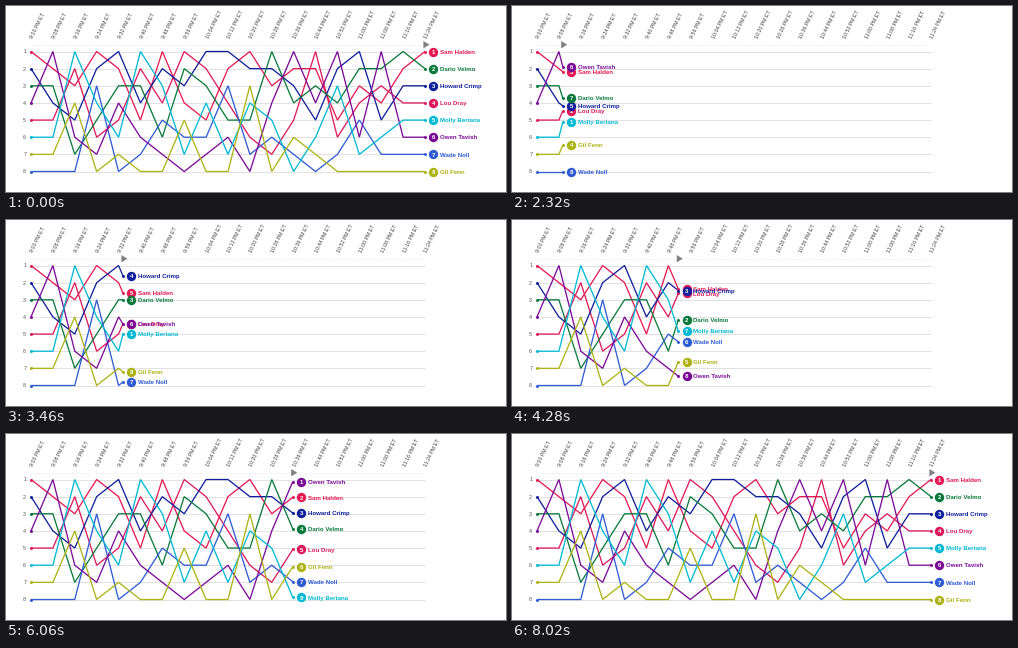
These frames come from a looping animation (500x186 px, 8340 ms). A matplotlib script:

```python
import math

import numpy as np
import matplotlib.pyplot as plt
from matplotlib.animation import FuncAnimation

W, H, DPI = 500, 186, 100
STEP_MS, LOOP_MS = 20, 8340
LEFT, RIGHT, TOP, BOTTOM = 25, 419, 45.5, 165.5
COLS = 19
GAP = (RIGHT - LEFT) / (COLS - 1)

# name, colour, rank at each time column; listed from back to front
RUNNERS = [
    ("Lou Dray", "#dc1a5b", "5526524124675164344"),
    ("Sam Halden", "#e51a53", "1231251452132253421"),
    ("Howard Crimp", "#10209a", "2452142311223521533"),
    ("Dario Velmo", "#0a7a3c", "3375336235514342212"),
    ("Wade Noll", "#2f5bd3", "8883875663767875777"),
    ("Owen Tavish", "#7a0a96", "4167467876841416166"),
    ("Molly Bertana", "#00b9d3", "6614613747458637655"),
    ("Gil Fenn", "#adb312", "7748788588386788888"),
]

# pace of the time pointer: ms -> x
PACE_T = [1920, 2320, 2760, 3460, 4440, 5100, 5280, 6060, 6960, 7800, 8020]
PACE_X = [25, 50.8, 74, 117, 176, 216.5, 229, 286.8, 343.5, 403, 419]


def pt(px):
    return px * 72 / DPI


def row_y(rank):
    return TOP + (rank - 1) * (BOTTOM - TOP) / 7


plt.rcParams["font.family"] = "Liberation Sans"
fig = plt.figure(figsize=(W / DPI, H / DPI), dpi=DPI, facecolor="white")
ax = fig.add_axes([0, 0, 1, 1])
ax.set_xlim(0, W)
ax.set_ylim(H, 0)
ax.axis("off")

col_x = LEFT + GAP * np.arange(COLS)

# grid, rank scale and time scale
ax.hlines([row_y(r) for r in range(1, 9)], LEFT - 2, RIGHT,
          colors="#dedede", linewidths=pt(0.9), zorder=1)
ax.plot([LEFT, RIGHT], [38.5, 38.5], color="#dcdcdc", lw=pt(0.8),
        ls=(0, (1, 2)), zorder=1)
for r in range(1, 9):
    ax.text(20.2, row_y(r) + 1.9, str(r), size=pt(5.4), color="#555555",
            ha="right", va="baseline")
for k, x in enumerate(col_x):
    hour, minute = divmod(9 * 60 + 8 * k, 60)
    ax.text(x + 2.4, 32.6, f"{hour}:{minute:02d} PM ET", size=pt(5.3),
            color="#444444", rotation=64, rotation_mode="anchor",
            ha="left", va="baseline")

pointer, = ax.fill([0, 1, 0], [0, 1, 2], color="#808080", lw=0, zorder=3)


class Runner:
    def __init__(self, name, color, ranks, z):
        self.ranks = [int(c) for c in ranks]
        self.ys = np.array([row_y(r) for r in self.ranks])
        self.line, = ax.plot([], [], color=color, lw=pt(1.3), zorder=4 + z / 10,
                             solid_joinstyle="miter", solid_capstyle="butt")
        self.dots, = ax.plot([], [], "o", color=color, ms=pt(3), mew=0, zorder=6)
        z = 10 + z
        self.badge, = ax.plot([], [], "o", color=color, ms=pt(9.4), mew=0, zorder=z)
        self.digit = ax.text(0, 0, "", size=pt(6), color="white", weight="bold",
                             ha="center", va="baseline", zorder=z + 0.1)
        self.label = ax.text(0, 0, name, size=pt(6.2), color=color, weight="bold",
                             ha="left", va="baseline", zorder=z + 0.1)

    def place(self, x):
        pos = (x - LEFT) / GAP
        done = int(pos + 1e-6) + 1
        y = np.interp(x, col_x, self.ys)
        self.line.set_data(np.append(col_x[:done], x), np.append(self.ys[:done], y))
        self.dots.set_data([LEFT, x], [self.ys[0], y])
        self.badge.set_data([x + 8.3], [y])
        self.digit.set_position((x + 8.3, y + 2.2))
        self.digit.set_text(str(self.ranks[math.ceil(pos - 1e-6)]))
        self.label.set_position((x + 15, y + 2.2))


runners = [Runner(*spec, z) for z, spec in enumerate(RUNNERS)]


def draw(i):
    t = i * STEP_MS
    ax.set_visible(not 1280 <= t < 1440)
    if t < 1280:
        x = RIGHT
    elif t < 1940:
        x = LEFT
    else:
        x = float(np.interp(t, PACE_T, PACE_X))
    pointer.set_xy([(x - 1.6, 35), (x + 4.4, 38.7), (x - 1.6, 42.4)])
    for runner in runners:
        runner.place(x)
    return []


anim = FuncAnimation(fig, draw, frames=LOOP_MS // STEP_MS, interval=STEP_MS,
                     init_func=lambda: draw(0), repeat=True, repeat_delay=0)
plt.show()
```
